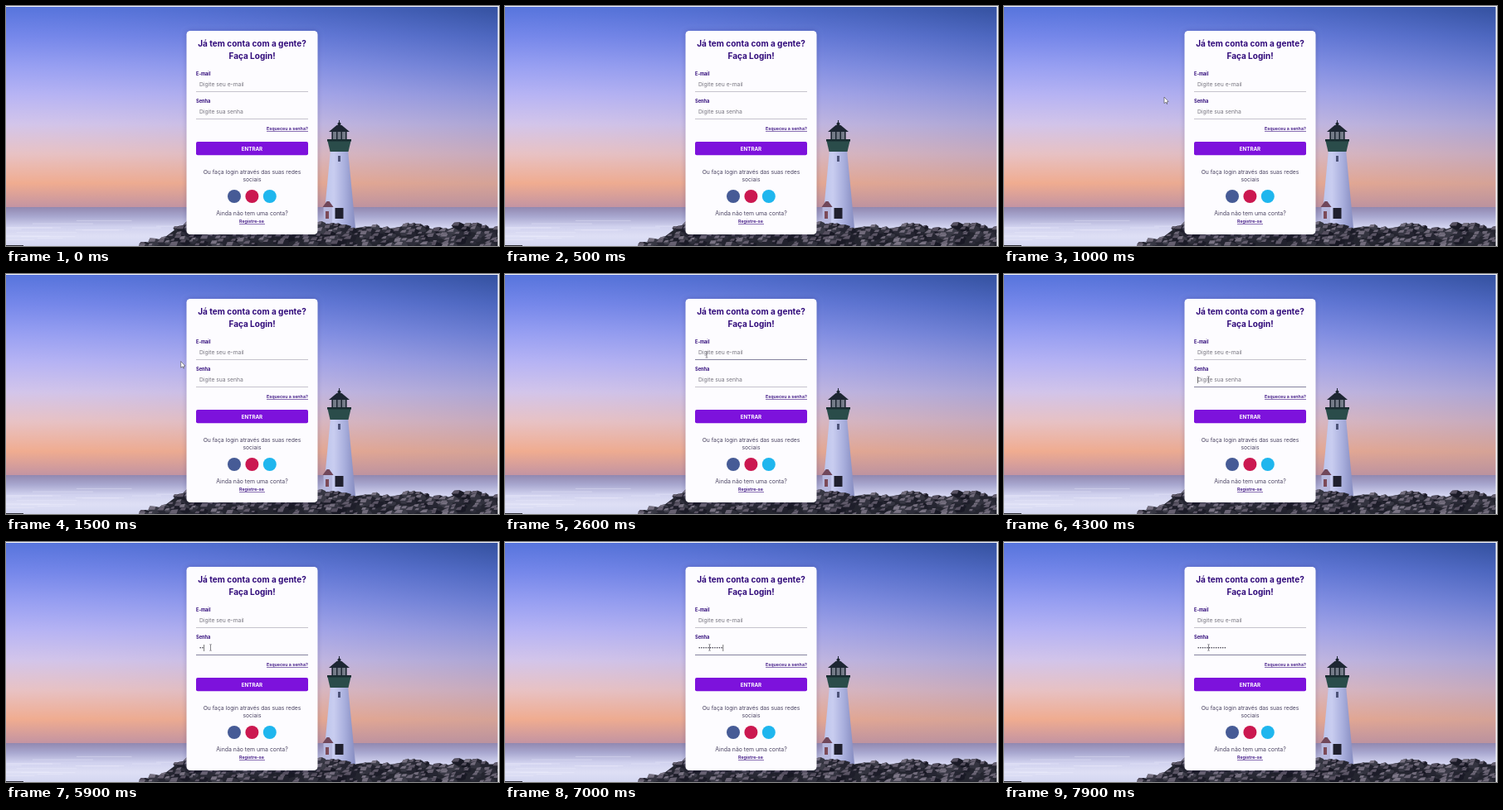
An HTML page with a canvas that plays this animation: 594x290 px, repeating every 8 s.

```html
<!DOCTYPE html>
<html lang="pt-BR">
<head>
<meta charset="utf-8">
<title>Login</title>
<style>
html, body { margin: 0; width: 100%; height: 100%; overflow: hidden; background: #fff; }
canvas { display: block; width: 594px; height: 290px; }
</style>
</head>
<body>
<canvas id="stage"></canvas>
<script>
const W = 594, H = 290, LOOP = 8000;
const MID = 296.5, LEFT = 229, FIELD_W = 135;
const FONT = 'Inter, "Open Sans", sans-serif';
const scale = window.devicePixelRatio || 1;

function prepare(canvas) {
  canvas.width = W * scale;
  canvas.height = H * scale;
  const c = canvas.getContext('2d');
  c.scale(scale, scale);
  return c;
}

const ctx = prepare(document.getElementById('stage'));
const backdrop = document.createElement('canvas');
const bg = prepare(backdrop);

let seed = 11;
function rand(a, b) {
  seed = (seed * 16807) % 2147483647;
  return a + (b - a) * seed / 2147483647;
}

// evenly spaced colours, running down or across
function blend(from, to, colors, across = false) {
  const g = across ? bg.createLinearGradient(from, 0, to, 0) : bg.createLinearGradient(0, from, 0, to);
  colors.forEach((color, i) => g.addColorStop(i / (colors.length - 1), color));
  return g;
}

function rect(c, x, y, w, h, fill) {
  c.fillStyle = fill;
  c.fillRect(x, y, w, h);
}

function poly(c, points, fill) {
  c.beginPath();
  points.forEach(([x, y]) => c.lineTo(x, y));
  c.closePath();
  c.fillStyle = fill;
  c.fill();
}

// symmetric about cx, with half-widths at the top and bottom
function taper(cx, top, bottom, halfTop, halfBottom, fill) {
  poly(bg, [[cx - halfTop, top], [cx + halfTop, top], [cx + halfBottom, bottom], [cx - halfBottom, bottom]], fill);
}

function disc(c, x, y, r, fill) {
  c.beginPath();
  c.arc(x, y, r, 0, Math.PI * 2);
  c.fillStyle = fill;
  c.fill();
}

function panel(x, y, w, h, r, fill) {
  bg.beginPath();
  bg.roundRect(x, y, w, h, r);
  bg.fillStyle = fill;
  bg.fill();
}

function text(c, str, x, y, size, color, weight = 400, align = 'left') {
  c.font = `${weight} ${size}px ${FONT}`;
  c.textAlign = align;
  c.fillStyle = color;
  c.fillText(str, x, y);
}

function drawSky() {
  const west = blend(0, 250, ['#5674dc', '#7587ea', '#979ff2', '#b7b4f4', '#d3c5ea', '#e8c2c4', '#f0ac90', '#b98ea6']);
  const east = blend(0, 250, ['#33509e', '#4c66be', '#6a7cd0', '#8c92d8', '#aba4d4', '#c6a9bc', '#d5a296', '#b48ea0']);
  rect(bg, 0, 0, W, 250, west);
  for (let x = 0; x < W; x++) {
    bg.globalAlpha = (x / W) ** 1.6;
    rect(bg, x, 0, 1, 250, east);
  }
  bg.globalAlpha = 1;
}

function drawSea() {
  rect(bg, 0, 243, W, 47, blend(243, H, ['#9188b0', '#a9a8d0', '#d0d1ee', '#dedff5', '#d3d6f0']));
  for (let i = 0; i < 14; i++) {
    rect(bg, rand(-30, 190), rand(256, 286), rand(30, 90), 1, 'rgba(240,240,252,.35)');
  }
}

function shore(x) {
  const ramp = Math.max(0, 218 - x) * .35;
  return 267 + ramp + 2.5 * Math.sin(x / 9) + 2 * Math.sin(x / 13.7 + 1);
}

function drawStone(x, y, r) {
  const tone = rand(22, 62);
  const points = [];
  for (let a = 0; a < 7; a++) {
    const angle = Math.PI * (1 + a * 2 / 7), reach = r * rand(.75, 1.1);
    points.push([x + reach * Math.cos(angle), y + .6 * reach * Math.sin(angle)]);
  }
  poly(bg, points, `rgb(${tone},${tone},${tone + 12})`);
  poly(bg, [...points.slice(0, 3), [x, y]], `rgb(${tone + 62},${tone + 56},${tone + 72})`);
}

function drawRocks() {
  const outline = [];
  for (let x = 163; x <= W; x += 3) outline.push([x, shore(x)]);
  poly(bg, [...outline, [W, H], [163, H]], '#24252f');
  for (let depth = 1; depth < 24; depth += 4) {
    for (let x = 166; x < W; x += rand(7, 17)) drawStone(x, shore(x) + depth + rand(-1, 2), rand(4, 9));
  }
}

function drawLighthouse() {
  const dark = '#1d2632', cx = 401.5;
  taper(cx, 174, 268, 10.5, 19.5, blend(382, 421, ['#b9c3ec', '#c9cdf0', '#a9afdd', '#868cc0'], true));
  taper(cx, 163, 176, 14, 11, '#2a4c4a');
  rect(bg, cx - 14.5, 161, 29, 2.5, '#182c30');
  rect(bg, cx - 9, 151, 18, 10, '#747b88');
  for (let i = 0; i < 4; i++) rect(bg, cx - 9 + i * 5.5, 151, 1.5, 10, dark);
  taper(cx, 144, 152, 3, 12.5, dark);
  disc(bg, cx, 142.5, 2, dark);
  rect(bg, cx - .5, 138, 1, 5, dark);
  rect(bg, cx - 1.5, 181, 3, 7, '#4d5378');
  // doorway and annex
  rect(bg, 396.5, 244, 10, 13, '#20202e');
  rect(bg, 382.5, 242, 10.5, 22, '#b6b8de');
  taper(388, 236, 243, 1.5, 6.5, '#70475a');
  rect(bg, 385, 248, 4, 9, '#7c4a58');
}

function link(label, x, y, w) {
  text(bg, label, x, y, 5.35, '#3a1080', 600);
  rect(bg, x, y + 1, w, .6, '#3a1080');
}

function drawCard() {
  bg.save();
  bg.shadowColor = 'rgba(40,30,90,.25)';
  bg.shadowBlur = 6 * scale;
  panel(217.5, 30, 158, 246, 4.5, '#fdfcff');
  bg.restore();

  const title = '#300a7a', body = '#4b4462';
  const centered = (str, y, size, color, weight) => text(bg, str, MID, y, size, color, weight, 'center');
  centered('Já tem conta com a gente?', 48.5, 10, title, 700);
  centered('Faça Login!', 63.5, 10, title, 700);
  text(bg, 'E-mail', LEFT, 84.2, 5.6, title, 700);
  text(bg, 'Senha', LEFT, 117.2, 5.6, title, 700);
  link('Esqueceu a senha?', 314, 150.3, 50);
  panel(LEFT, 164, FIELD_W, 16.3, 2, '#7d12dc');
  centered('ENTRAR', 174.7, 6.2, '#fff', 700);
  centered('Ou faça login através das suas redes', 202.8, 6.75, body);
  centered('sociais', 212, 6.75, body);
  ['#465b96', '#cb1850', '#1fb6ee'].forEach((color, i) => disc(bg, 275 + i * 21.4, 230, 8, color));
  centered('Ainda não tem uma conta?', 252.8, 6.9, body);
  link('Registre-se', 281, 262, 31);
}

function drawBackdrop() {
  drawSky();
  drawSea();
  drawLighthouse();
  drawRocks();
  drawCard();
  rect(bg, 0, 0, W, 1, '#f7f7fa');
  rect(bg, 592.5, 0, 1.5, H, '#f7f7fa');
  rect(bg, 0, 289, 21, 1, '#2b2b34');
}

const EMAIL_CLICK = 2100, PASS_CLICK = 4260;
const FIRST_KEY = 5400, SECOND_KEY = 5900, BURST = 6000, KEY_GAP = 166;
const LENGTH = 13, PITCH = 2.68, BLINK = 500;

// two slow keys, then a steady burst; returns count and time of the last key
function typing(t) {
  if (t < FIRST_KEY) return [0, t < PASS_CLICK ? EMAIL_CLICK : PASS_CLICK];
  if (t < SECOND_KEY) return [1, FIRST_KEY];
  if (t < BURST) return [2, SECOND_KEY];
  const count = Math.min(LENGTH, 5 + Math.floor((t - BURST) / KEY_GAP));
  return [count, BURST + (count - 5) * KEY_GAP];
}

function glide(t, start, end) {
  const p = Math.min(1, Math.max(0, (t - start) / (end - start)));
  return p * p * (3 - 2 * p);
}

function drawPointer(t) {
  if (t < 900) return;
  const a = glide(t, 1200, 1950), b = glide(t, 3550, 4150);
  const x = 193 + 50 * a + 3.5 * b, y = 110 - 12.5 * a + 30 * b;
  const overField = x > LEFT && (Math.abs(y - 95.5) < 8.5 || Math.abs(y - 128.5) < 8.5);
  if (overField) {
    rect(ctx, x - .4, y - 3.5, .8, 7, '#66656c');
    for (const end of [-4, 3.3]) rect(ctx, x - 1.5, y + end, 3, .7, '#8a8990');
    return;
  }
  poly(ctx, [[x, y], [x, y + 7.6], [x + 2, y + 6.2], [x + 3.5, y + 8.6], [x + 3.4, y + 5.7], [x + 5.1, y + 5.5]], '#fff');
  ctx.strokeStyle = '#444';
  ctx.lineWidth = .6;
  ctx.stroke();
}

function drawField(hint, y, focused, typed, caretOn) {
  rect(ctx, LEFT, y + 6, FIELD_W, 1, focused ? '#85839f' : '#c6c3cd');
  if (!typed) text(ctx, hint, 233, y + .2, 6.75, '#77757f');
  for (let i = 0; i < typed; i++) disc(ctx, 234.2 + i * PITCH, y - 2.3, .8, '#33303f');
  if (focused && caretOn) rect(ctx, 233 + typed * PITCH, y - 6, .7, 8, '#444');
}

function draw(t) {
  ctx.drawImage(backdrop, 0, 0, W, H);
  const [typed, lastInput] = typing(t);
  const caretOn = Math.floor((t - lastInput) / BLINK) % 2 === 0;
  const onPass = t >= PASS_CLICK;
  drawField('Digite seu e-mail', 97, t >= EMAIL_CLICK && !onPass, 0, caretOn);
  drawField('Digite sua senha', 130, onPass, typed, caretOn);
  drawPointer(t);
}

drawBackdrop();
const start = performance.now();
function loop() {
  draw((performance.now() - start) % LOOP);
  requestAnimationFrame(loop);
}
loop();
</script>
</body>
</html>
```
